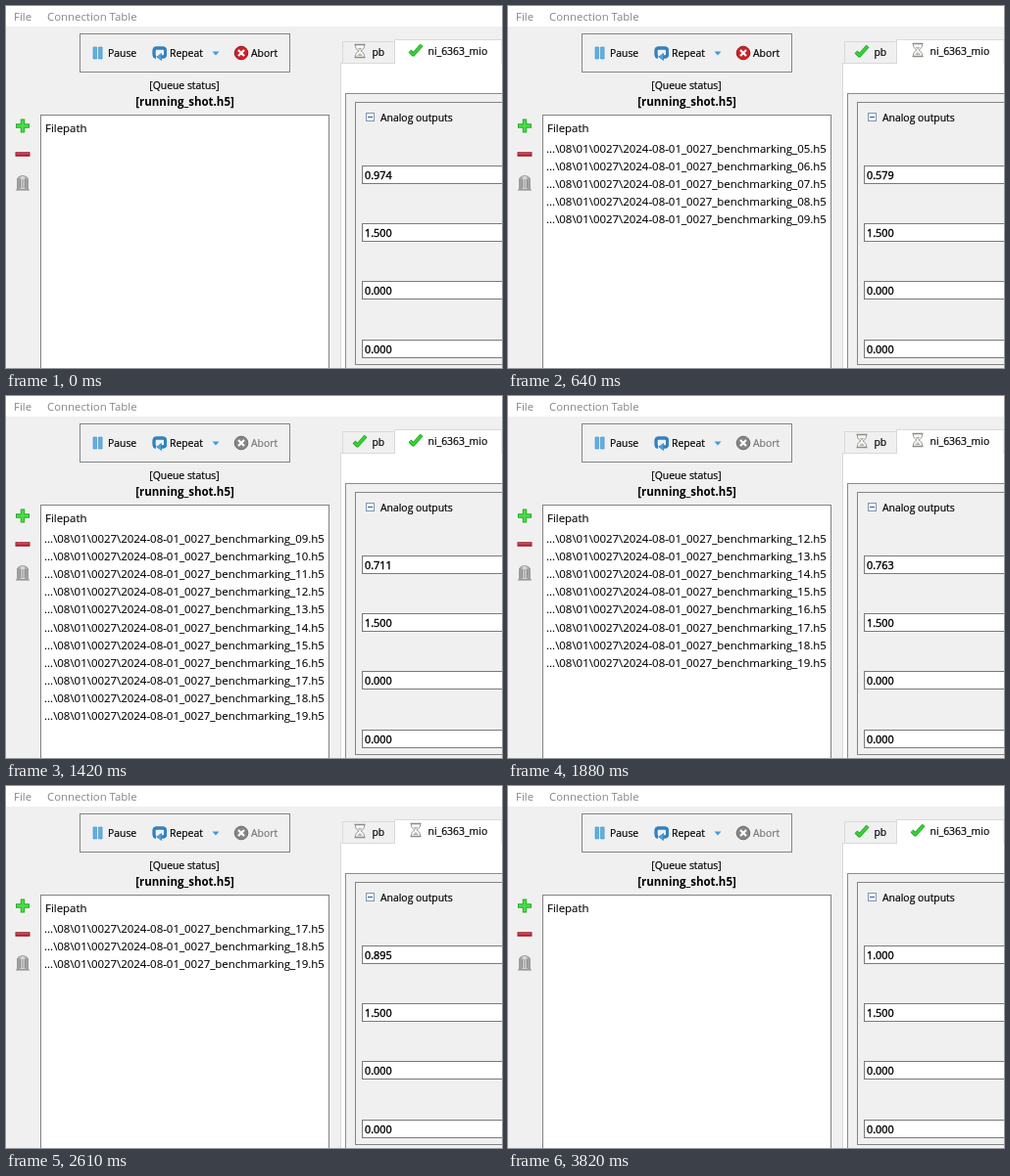
These frames come from a looping animation (506 px wide and 370 px high, 3850 ms). An HTML page:

```html
<!DOCTYPE html>
<html lang="en">
<head>
<meta charset="utf-8">
<title>Shot queue</title>
<style>
  html, body { margin: 0; width: 100%; height: 100%; overflow: hidden; background: #f0f0f0; }
  svg { display: block; width: 506px; height: 370px; }
  text { font: 10.4px "Open Sans", "Noto Sans", sans-serif; fill: #000; stroke: #000; stroke-width: .2px; white-space: pre; }
  .menu { font-size: 11.4px; fill: #868686; stroke: none; }
  .list { font-size: 11.45px; stroke-width: .1px; }
  .field { font-size: 10.8px; stroke-width: .4px; }
  .bold { font-size: 11.5px; font-weight: 700; stroke: none; }
  .busy .check, .hourglass { display: none; }
  .busy .hourglass { display: inline; }
  .off circle { fill: #858585; stroke: #6c6c6c; }
  .off text { fill: #787878; stroke: #787878; }
</style>
</head>
<body>
<svg viewBox="0 0 506 370">
  <defs>
    <linearGradient id="steel"><stop stop-color="#888"/><stop offset=".5" stop-color="#e4e4e4"/><stop offset="1" stop-color="#888"/></linearGradient>
    <g id="check" fill="none" stroke-linejoin="round">
      <path d="M-6 1 L-2.5 4.500 L6 -5" stroke="#27a327" stroke-width="4"/>
      <path d="M-6 1 L-2.5 4.500 L6 -5" stroke="#35d435" stroke-width="2.400"/>
    </g>
    <g id="hourglass" stroke="#a0a0a0">
      <path d="M-4.5 -6.5 V-4 Q-4 -1.5 -1 0 Q-4 1.5 -4.5 4 V6.5 H4.5 V4 Q4 1.5 1 0 Q4 -1.5 4.5 -4 V-6.5 Z" fill="#f7f7f7"/>
      <path d="M-5.5 -6.5 H5.5 M-5.5 6.5 H5.5" stroke="#8c8c8c" stroke-width="1.6"/>
      <path d="M-2.5 -3 H2.5 L0 -.5 Z M-3 5 L0 2 L3 5 Z" fill="#bdb5a4" stroke="none"/>
    </g>
  </defs>

  <rect width="506" height="370" fill="#f0f0f0"/>
  <rect width="506" height="21" fill="#fff"/>
  <text class="menu" x="8" y="15">File</text>
  <text class="menu" x="42" y="15">Connection Table</text>

  <rect x="75.5" y="28.5" width="214" height="39" fill="none" stroke="#858585"/>
  <path d="M89 42h3.600v12h-3.600z M94.500 42h3.600v12h-3.600z" fill="#5fb0e2" stroke="#3f8fc8" stroke-width=".6"/>
  <text x="104" y="52">Pause</text>
  <g fill="none" stroke-linejoin="round">
    <path id="loop" d="M153 52.500 Q151 52 151 49.500 V45.500 Q151 43 153.500 43 H160 Q162.500 43 162.500 45.500 V49.500 Q162.500 52 160 52 H157" stroke="#3182c0" stroke-width="2.800"/>
    <use href="#loop"/>
    <path d="M158.500 48.500 V55.500 L154 52 Z" fill="#4aa5e0" stroke="#3182c0" stroke-width=".8"/>
  </g>
  <text x="167" y="52">Repeat</text>
  <path d="M210.5 46.5 h7 l-3.5 4 z" fill="#3d9bdc"/>
  <g id="abort">
    <circle cx="240" cy="48" r="6.8" fill="#cf2027" stroke="#a3161c"/>
    <path d="M237 45 l6 6 M243 45 l-6 6" stroke="#fff" stroke-width="2.2"/>
    <text x="250" y="52">Abort</text>
  </g>
  <text x="182" y="85" text-anchor="middle">[Queue status]</text>
  <text class="bold" x="182.5" y="102" text-anchor="middle">[running_shot.h5]</text>

  <path d="M17 115.500 v14 M10 122.500 h14" stroke="#28a828" stroke-width="4.400"/>
  <path d="M17 116.500 v12 M11 122.500 h12" stroke="#45e045" stroke-width="2.600"/>
  <path d="M9.500 151.500 h15" stroke="#9c2434" stroke-width="4.600"/>
  <path d="M10.500 151 h13" stroke="#d8485a" stroke-width="1.600"/>
  <path d="M11.5 187.5 V177 Q12 174 17 173.5 Q22 174 22.5 177 V187.5 Z" fill="url(#steel)" stroke="#a0a0a0"/>
  <path d="M14.5 177 v9 M17 177 v9 M19.5 177 v9 M10 188 h14" stroke="#8a8a8a"/>

  <rect x="35.5" y="111.5" width="294" height="270" fill="#fff" stroke="#828282"/>
  <text class="list" x="40" y="129">Filepath</text>
  <g id="rows"></g>

  <rect x="341.5" y="58.5" width="170" height="320" fill="#fff" stroke="#d9d9d9"/>
  <rect x="343.5" y="36.5" width="53" height="22" fill="#f0f0f0" stroke="#d9d9d9"/>
  <path d="M396.5 59 V34.5 H506 V59" fill="#fff" stroke="#d9d9d9"/>
  <g class="tab" transform="translate(361 46)"><use class="check" href="#check"/><use class="hourglass" href="#hourglass"/></g>
  <text x="373.5" y="51">pb</text>
  <g class="tab" transform="translate(418 45)"><use class="check" href="#check"/><use class="hourglass" href="#hourglass"/></g>
  <text x="430.5" y="50">ni_6363_mio</text>

  <rect x="346.5" y="89.5" width="170" height="300" fill="#f0f0f0" stroke="#8c8c8c"/>
  <rect x="356.5" y="98.5" width="160" height="268" fill="#f0f0f0" stroke="#858585"/>
  <rect x="367.5" y="109.5" width="8" height="8" fill="#fff" stroke="#7896b8"/>
  <path d="M369 113.5 h5" stroke="#2a55a0"/>
  <text x="382" y="118">Analog outputs</text>
  <g id="fields"></g>
</svg>
<script>
  const LOOP = 3850, SHOTS = 20;
  const $ = id => document.getElementById(id);
  const [pbTab, niTab] = document.querySelectorAll('.tab');

  // Time in ms against shot number; the fraction is progress through the shot.
  const progress = [[0, -.8], [162, 0], [640, 4.2], [1060, 6.88], [1090, 6.98], [1880, 11.54],
                    [2610, 16.54], [3090, 19.74], [3150, 19.84], [3250, 19.99], [LOOP, 19.99]];

  function addText(parent, className, x, y, content = '') {
    const el = document.createElementNS('http://www.w3.org/2000/svg', 'text');
    el.setAttribute('class', className);
    el.setAttribute('x', x);
    el.setAttribute('y', y);
    el.textContent = content;
    parent.append(el);
    return el;
  }

  const rows = Array.from({ length: 12 }, (_, i) => addText($('rows'), 'list', 39, 150 + 18.1 * i));
  const fields = ['', '1.500', '0.000', '0.000'].map((value, i) => {
    const y = Math.floor(163.5 + 59.2 * i) + .5;
    $('fields').insertAdjacentHTML('beforeend',
      `<rect x="363.5" y="${y}" width="150" height="18" fill="#fff" stroke="#7a7a7a"/>`);
    return addText($('fields'), 'field', 366, y + 13.9, value);
  });

  function shotAt(t) {
    const i = progress.findIndex(([end]) => end > t);
    const [t0, s0] = progress[i - 1], [t1, s1] = progress[i];
    return s0 + (s1 - s0) * (t - t0) / (t1 - t0);
  }

  function draw(t) {
    const position = shotAt(t), shot = Math.floor(position), u = position - shot;

    const added = Math.min(SHOTS, Math.max(0, Math.floor((t - 110) / 52)));
    rows.forEach((row, i) => {
      const n = shot + 1 + i;
      row.textContent = n < added
        ? `...\\08\\01\\0027\\2024-08-01_0027_benchmarking_${String(n).padStart(2, '0')}.h5` : '';
    });

    // Devices arm, run the shot, then return to manual control.
    const starting = u < .12, arming = u >= .12 && u < .42;
    const stopping = u >= .5 && u < .7, settling = u >= .7 && u < .85;
    const odd = shot % 2 !== 0;
    pbTab.classList.toggle('busy', starting || stopping || arming && odd);
    niTab.classList.toggle('busy', starting || stopping || settling || arming && !odd);
    $('abort').classList.toggle('off', u >= .5);

    const finished = (shot - (u < .85) + SHOTS) % SHOTS;
    fields[0].textContent = (.5 + .5 * finished / (SHOTS - 1)).toFixed(3);
  }

  const start = performance.now();
  function tick() {
    draw((performance.now() - start) % LOOP);
    requestAnimationFrame(tick);
  }
  tick();
</script>
</body>
</html>
```
